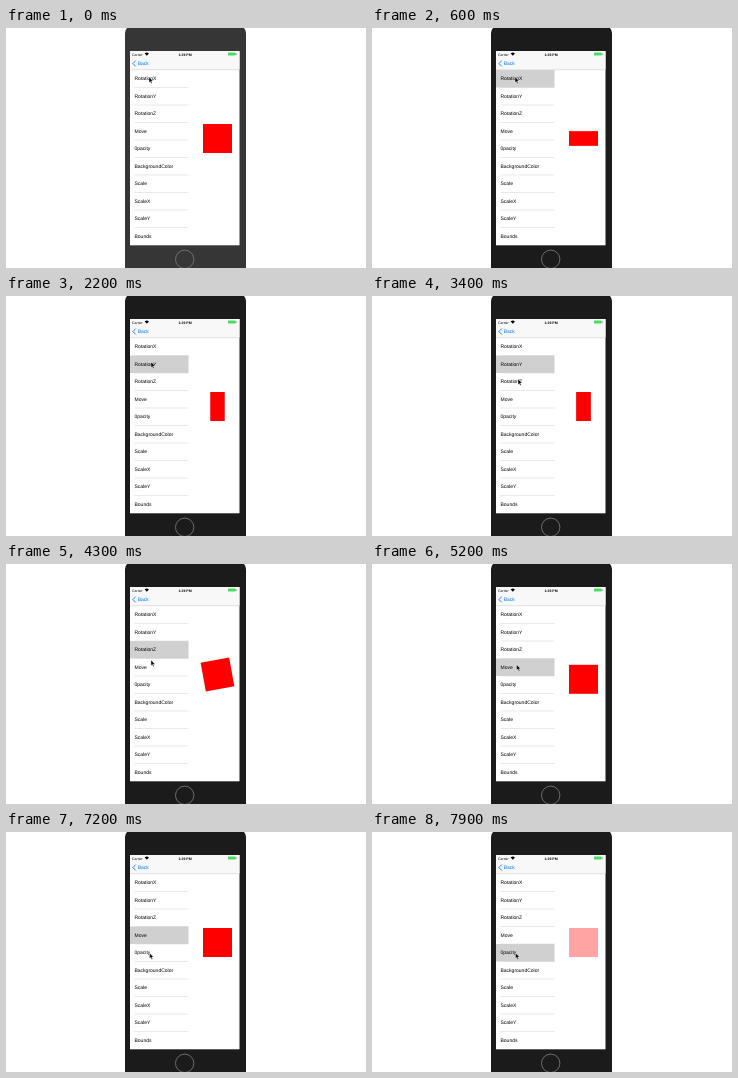
These frames come from a looping animation (360 by 240 pixels, 8 s). An HTML page:

```html
<!DOCTYPE html>
<html>
<head>
<meta charset="utf-8">
<style>
html, body { margin: 0; width: 100%; height: 100%; overflow: hidden; background: #fff; }
svg { display: block; width: 100vw; height: 100vh; }
text { font-family: "Liberation Sans", Arial, sans-serif; text-rendering: geometricPrecision; }
</style>
</head>
<body>
<svg viewBox="0 0 360 240">
  <rect id="body" x="119" y="-2" width="121" height="260" rx="7"/>
  <circle cx="178.7" cy="231.3" r="9.2" fill="none" stroke="#77777a" stroke-width=".9"/>
  <rect x="124" y="23" width="109.5" height="194.3" fill="#fff"/>

  <rect x="124" y="23" width="109.5" height="18.6" fill="#f8f8f8"/>
  <path d="M124 41.7H233.5" stroke="#b8b8b8" stroke-width=".4"/>
  <g font-size="3.5">
    <text x="126" y="27.6">Carrier</text>
    <text x="179" y="27.6" font-weight="bold" text-anchor="middle">1:29 PM</text>
  </g>
  <path d="M138.7 25.4Q140.8 23.6 142.9 25.4L140.8 27.8Z"/>
  <rect x="222" y="24.6" width="7.6" height="3" rx=".7" fill="#4cd964"/>
  <path d="M230.3 25.5v1.2" stroke="#222" stroke-width=".6"/>
  <path d="M129.7 32.6L126.9 35.5L129.7 38.4" fill="none" stroke="#007aff" stroke-width=".9"/>
  <text x="131.7" y="37.4" font-size="5" fill="#007aff">Back</text>

  <rect id="glow" x="124" width="58.5" height="17.5" fill="#d0d0d0"/>
  <g id="list" font-size="5"></g>
  <rect id="box" x="-14.5" y="-14.5" width="29" height="29" fill="#f00"/>
  <path id="mouse" d="M0 0V5.6L1.3 4.4L2.2 6.5L3.2 6.1L2.3 4.1H4Z" stroke="#fff" stroke-width=".4"/>
</svg>
<script>
const $ = id => document.getElementById(id);
const LOOP = 8000, TOP = 42, ROW = 17.5;
const labels = ["RotationX", "RotationY", "RotationZ", "Move", "0pacity",
  "BackgroundColor", "Scale", "ScaleX", "ScaleY", "Bounds"];

$("list").innerHTML = labels.map((label, i) => {
  const y = TOP + i * ROW;
  const line = i < labels.length - 1
    ? `<path d="M128.5 ${y + ROW}H182.5" stroke="#d2d2d5" stroke-width=".5"/>` : "";
  return `<text x="128.5" y="${y + 10.4}">${label}</text>${line}`;
}).join("");

// cubic-bezier(.42, 0, .58, 1)
function ease(x) {
  let lo = 0, hi = 1, u = .5;
  for (let i = 0; i < 24; i++) {
    u = (lo + hi) / 2;
    if (3 * u * (1 - u) * (.42 * (1 - u) + .58 * u) + u ** 3 < x) lo = u;
    else hi = u;
  }
  return u * u * (3 - 2 * u);
}

// One second forth, one second back
const swing = age => age < 0 || age > 2000 ? 0 : ease(1 - Math.abs(1 - age / 1000));

// Each row's effect replaces the one before it
const starts = [0, 1800, 3470, 5000, 7210];
const effects = [
  k => [`scale(1 ${Math.abs(Math.cos(k * Math.PI))})`],
  k => [`scale(${Math.abs(Math.cos(k * Math.PI))} 1)`],
  k => [`rotate(${k * 180})`],
  k => [`translate(0 ${k * 58.3})`],
  k => ["", 1 - .8 * k]
];

// Pointer moves: start, end, x, y
const moves = [
  [0, 0, 143, 49],
  [600, 1200, 145, 66],
  [2300, 2900, 146, 83],
  [3850, 4550, 144.6, 100.7],
  [5650, 6350, 143.5, 121]
];

function pointer(t) {
  let x = 0, y = 0;
  for (const [from, to, nx, ny] of moves) {
    if (t < from) break;
    const k = t >= to ? 1 : ease((t - from) / (to - from));
    x += (nx - x) * k;
    y += (ny - y) * k;
  }
  return `translate(${x} ${y})`;
}

function draw(now) {
  const t = now % LOOP;
  const row = starts.findLastIndex(s => t >= s);
  const [shape, alpha = 1] = effects[row](swing(t - starts[row]));
  $("box").setAttribute("transform", `translate(211.5 110.5) ${shape}`);
  $("box").setAttribute("opacity", alpha);
  $("glow").setAttribute("y", TOP + row * ROW);
  $("glow").setAttribute("opacity", t < 100 ? 0 : 1);
  $("body").setAttribute("fill", t < 100 ? "#363636" : "#1b1b1b");
  $("mouse").setAttribute("transform", pointer(t));
}

const begin = performance.now();
function tick() {
  draw(performance.now() - begin);
  requestAnimationFrame(tick);
}
tick();
</script>
</body>
</html>
```
